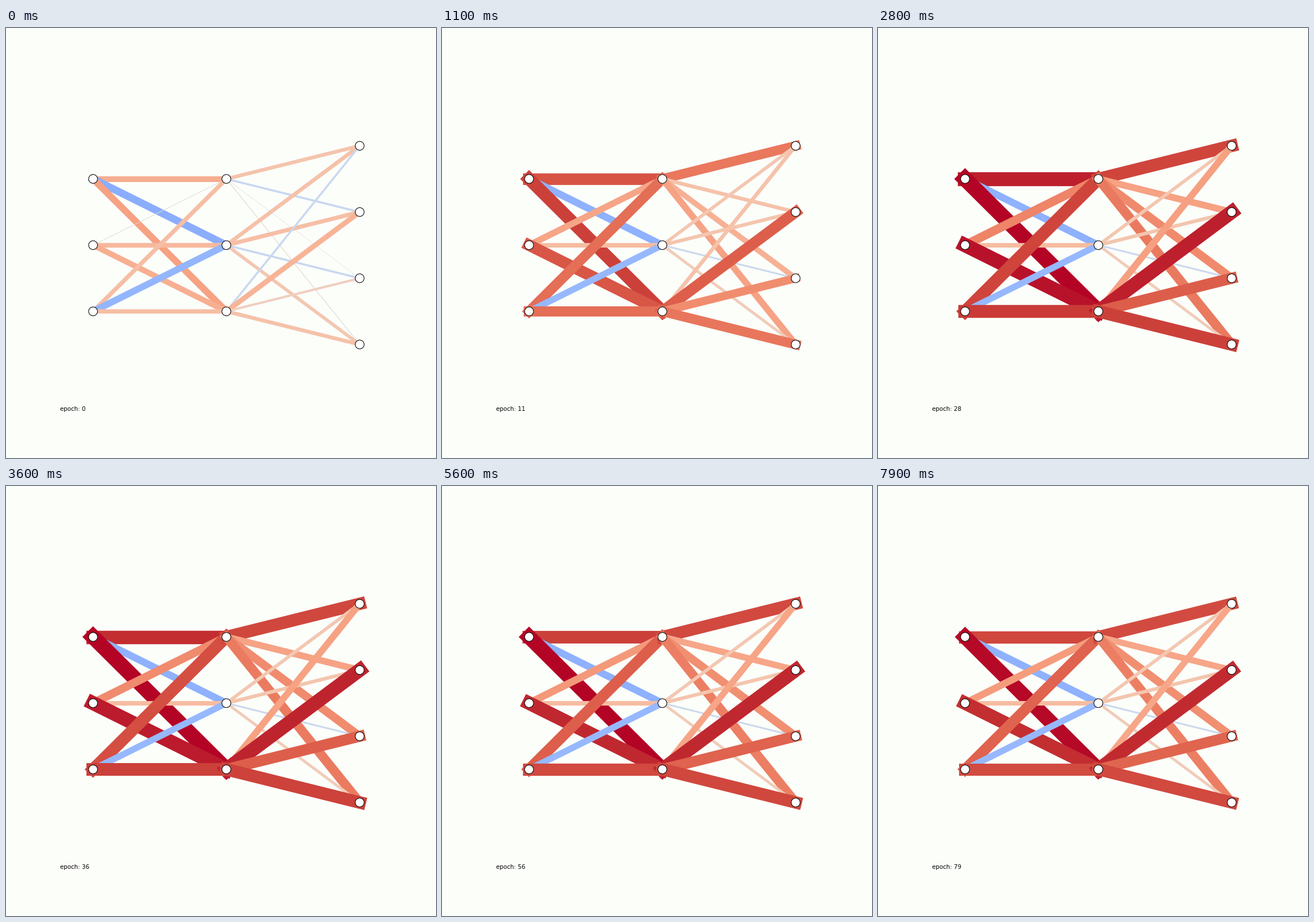
These frames come from a looping animation (748x748 px, 8 s). A matplotlib script:

```python
import numpy as np
import matplotlib.pyplot as plt
from matplotlib.animation import FuncAnimation

FRAMES, INTERVAL = 80, 100
DPI = 74.8
PT = 72 / DPI            # points per pixel
FULL = 25.5              # line width in pixels at the end of the colour map
PEAK = 15.75             # width gained by a training edge before it settles
LAYERS = (3, 3, 4)
STEP_X, STEP_Y = 0.4, 0.2
IDLE = 1                 # hidden unit that stops learning almost at once

plt.rcParams["font.family"] = "DejaVu Sans"
cmap = plt.get_cmap("coolwarm")

# Signed starting widths in pixels: rows are sources, columns are ends.
START = (
    np.array([[10, -13, 11.7], [1, 8.2, 9.9], [7.4, -11.7, 7.5]]),
    np.array([[6.4, -3.6, -0.6, 1.2], [6.8, 7.3, -3.6, 5.8],
              [-3.5, 9, 4.1, 6.7]]),
)
SETTLED = ((11.1, 0, 13.4), (14.5, 0, 14.5))   # final gain per hidden unit
FADE = (0.04, 0.15)                            # loss around the idle unit


def gain(t, final):
    """Steady climb to PEAK that levels off, then eases down to final."""
    u = t / 16.7
    rise = u / (1 + u ** 6) ** (1 / 6)
    ease = 1 / (1 + (t / 36) ** 3.5)
    return rise * (final + (PEAK - final) * ease)


def width(layer, a, b, t):
    unit = a if layer else b
    start = START[layer][a, b]
    if unit == IDLE:
        return start * (1 - FADE[layer] * min(t / 4, 1))
    return start + gain(t, SETTLED[layer][unit])


def node(layer, k):
    top = 0.5 + STEP_Y * (LAYERS[layer] - 1) / 2
    return 0.1 + STEP_X * layer, top - STEP_Y * k


fig = plt.figure(figsize=(10, 10), dpi=DPI, facecolor="#fcfefa")
ax = fig.add_axes([0.125, 0.11, 0.775, 0.77])
ax.set(xlim=(0, 1), ylim=(0, 1))
ax.axis("off")

edges = {}
for layer, start in enumerate(START):
    for a, b in np.ndindex(start.shape):
        xs, ys = zip(node(layer, a), node(layer + 1, b))
        edges[layer, a, b], = ax.plot(xs, ys, solid_capstyle="projecting")

for layer, count in enumerate(LAYERS):
    for k in range(count):
        ax.add_patch(plt.Circle(node(layer, k), STEP_Y / 15, fc="white",
                                ec="black", lw=1, zorder=4))

label = ax.text(0, 0, "", fontsize=9.9, color="black")


def update(epoch):
    for key, line in edges.items():
        w = width(*key, epoch)
        line.set_linewidth(abs(w) * PT)
        line.set_color(cmap(float(np.clip(0.5 + w / (2 * FULL), 0, 1))))
    label.set_text(f"epoch: {epoch}")
    return [*edges.values(), label]


anim = FuncAnimation(fig, update, frames=FRAMES, interval=INTERVAL,
                     repeat=True, repeat_delay=0, blit=False)
plt.show()
```
